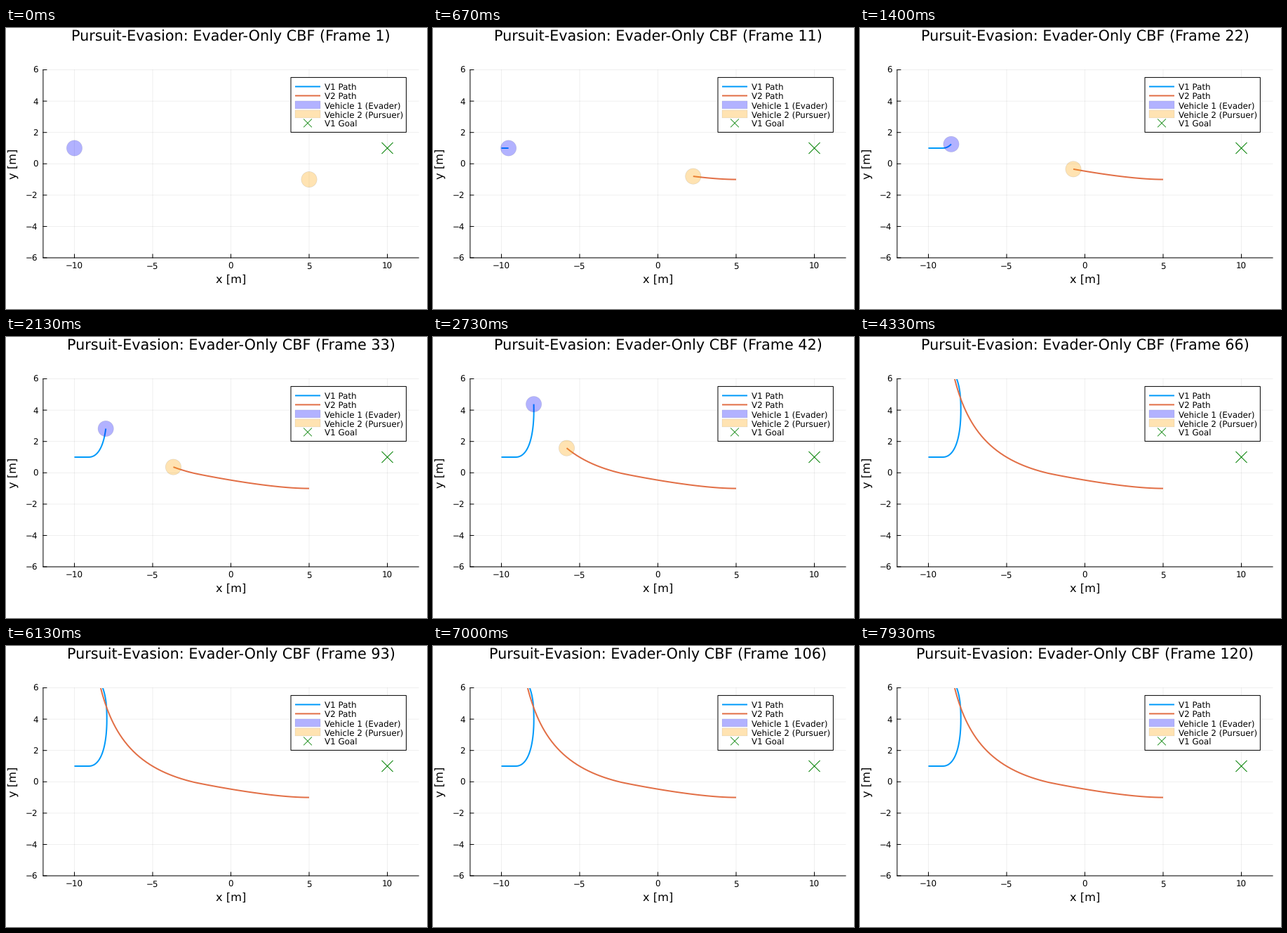
Animation of 600x400 px, one loop 8000 ms. Source, as a matplotlib script:

```python
import matplotlib.pyplot as plt
import numpy as np
from matplotlib.animation import FuncAnimation
from matplotlib.patches import Circle, Rectangle

W, H, DPI = 600, 400, 100
STEPS, LOOP, TICK = 120, 8000, 20
PT = 72 / DPI
UNIT, X0, Y0 = 22.3, 320.5, 193.3
LEFT, RIGHT = X0 - 12 * UNIT, X0 + 12 * UNIT
TOP, BOTTOM = Y0 - 6 * UNIT, Y0 + 6 * UNIT
BLUE, ORANGE, GREEN = "#009afa", "#e26f46", "#008000"
VIOLET, AMBER = (0, 0, 1), (1, 165 / 255, 0)

plt.rcParams.update({"font.family": "DejaVu Sans", "text.hinting": "none",
                     "path.snap": False})

fig = plt.figure(figsize=(W / DPI, H / DPI), dpi=DPI, facecolor="white")
ax = fig.add_axes([0, 0, 1, 1])
ax.set_xlim(0, W)
ax.set_ylim(H, 0)
ax.axis("off")


def line(xs, ys, color="black", width=1.0, **kw):
    return ax.plot(xs, ys, color=color, lw=width * PT, **kw)[0]


def label(x, y, text, size, ha="center", va="baseline", **kw):
    return ax.text(x, y, text, fontsize=size * PT, ha=ha, va=va, **kw)


def number(v):
    return str(v).replace("-", "\u2212")


def cross(x, y, half, width, z):
    for s in (-1, 1):
        line([x - half, x + half], [y - s * half, y + s * half], GREEN, width, zorder=z)


def shade(color):
    return dict(facecolor=(*color, 0.3), edgecolor=(0, 0, 0, 0.12), lw=0.6 * PT)


def bezier(*points):
    a, b, c, d = np.array(points, float)
    t = np.linspace(0, 1, 100)[:, None]
    u = 1 - t
    return u**3 * a + 3 * u * u * t * b + 3 * u * t * t * c + t**3 * d


def travel(curve, dist):
    """Positions at the given distances, going straight on past the end."""
    curve = np.vstack([curve, curve[-1] + 500 * (curve[-1] - curve[-2])])
    arc = np.r_[0, np.cumsum(np.hypot(*np.diff(curve, axis=0).T))]
    return np.column_stack([np.interp(dist, arc, axis) for axis in curve.T])


# The evader speeds up evenly to its limit, the pursuer keeps its speed.
n = np.arange(STEPS)
V_START, ACCEL, V_MAX, V_PURSUER = 0.45, 0.112, 3.88, 6.14
m = np.minimum(n, (V_MAX - V_START) / ACCEL)
evader_dist = V_START * m + ACCEL * m**2 / 2 + V_MAX * (n - m)

evader = travel(np.vstack([
    [(97.5, 171)],
    bezier((118, 171), (137, 171), (143.7, 138), (143.7, 105)),
    bezier((143.7, 105), (143.7, 85), (142.5, 72), (137.3, 58))]), evader_dist)
pursuer = travel(np.vstack([
    bezier((432, 215.6), (390, 215.6), (325, 205.5), (270, 194.4)),
    bezier((270, 194.4), (188, 175.5), (153.5, 132), (135, 60))]), V_PURSUER * n)

# Grid, ticks and axes
for v in range(-10, 11, 5):
    x = X0 + v * UNIT
    line([x, x], [TOP, BOTTOM], width=0.8, alpha=0.08, zorder=1)
    line([x, x], [BOTTOM, BOTTOM - 5], zorder=5)
    label(x - 0.5, 343, number(v), 11.86)
for v in range(-6, 7, 2):
    y = Y0 - v * UNIT
    line([LEFT, RIGHT], [y, y], width=0.8, alpha=0.08, zorder=1)
    line([LEFT, LEFT + 5], [y, y], zorder=5)
    label(45.5, y + 4.5, number(v), 11.86, ha="right")
line([LEFT, LEFT, RIGHT], [TOP, BOTTOM, BOTTOM], zorder=5)
label(X0, 363, "x [m]", 16.3)
label(18.4, Y0, "y [m]", 16.3, ha="right", va="center", rotation=90)
title = label(X0 + 0.2, 19, "", 20.75)

# Moving parts
area = Rectangle((LEFT, TOP), RIGHT - LEFT, BOTTOM - TOP, transform=ax.transData)
trails, discs = [], []
for color, fill in ((BLUE, VIOLET), (ORANGE, AMBER)):
    trail = line([], [], color, 2, zorder=2, solid_joinstyle="round",
                 solid_capstyle="butt")
    disc = ax.add_patch(Circle((0, 0), UNIT / 2, zorder=3, **shade(fill)))
    for part in (trail, disc):
        part.set_clip_path(area)
    trails.append(trail)
    discs.append(disc)
cross(X0 + 10 * UNIT, Y0 - UNIT, 7.7, 1, 4)

# Legend
ax.add_patch(Rectangle((406, 70.4), 164.4, 78, facecolor="white", edgecolor="black",
                       lw=PT, zorder=6))
names = ["V1 Path", "V2 Path", "Vehicle 1 (Evader)", "Vehicle 2 (Pursuer)", "V1 Goal"]
rows = [83.4 + 13 * i for i in range(5)]
for y, name in zip(rows, names):
    label(453.7, y + 4.6, name, 11.86, ha="left", zorder=8)
for y, color in zip(rows, (BLUE, ORANGE)):
    line([412, 448], [y, y], color, 2, zorder=7, solid_capstyle="butt")
for y, fill in zip(rows[2:], (VIOLET, AMBER)):
    ax.add_patch(Rectangle((412, y - 5.5), 36, 11, zorder=7, **shade(fill)))
cross(430, rows[4], 5.6, 0.8, 7)


def update(tick):
    # Steps last 66.7 ms; the offset keeps each one from starting a tick late.
    i = int((tick * TICK + 14) * STEPS / LOOP)
    title.set_text(f"Pursuit-Evasion: Evader-Only CBF (Frame {i + 1})")
    for path, trail, disc in zip((evader, pursuer), trails, discs):
        trail.set_data(*path[:i + 1].T)
        disc.center = tuple(path[i])
    return [title, *trails, *discs]


anim = FuncAnimation(fig, update, frames=LOOP // TICK, interval=TICK, repeat=True,
                     repeat_delay=0, blit=False)
plt.show()
```
